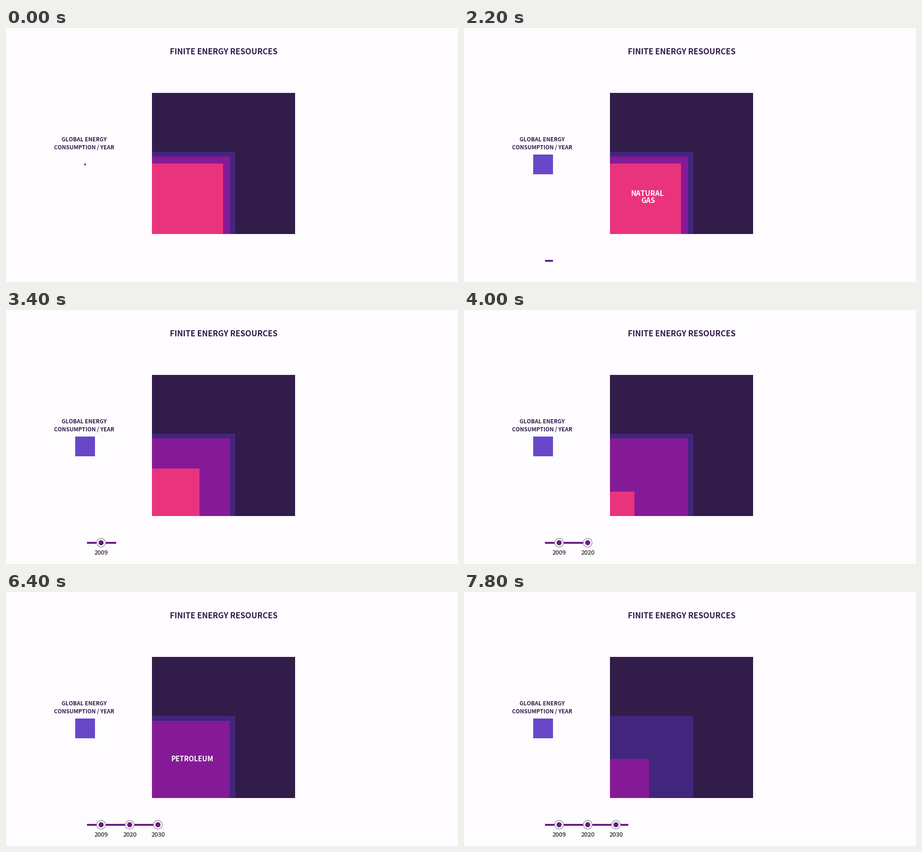
These frames come from a looping animation (960 px wide and 540 px high, 8000 ms). A matplotlib script:

```python
import numpy as np
import matplotlib.pyplot as plt
from matplotlib.animation import FuncAnimation
from matplotlib.patches import Circle, Rectangle

W, H, DPI = 960, 540, 100
STEP, FRAMES = 200, 40
LEFT, BASE = 310, 437.5

INK = "#311c4a"
BLUE = "#42257d"
PURPLE = "#851a96"
PINK = "#ea337d"
VIOLET = "#6848c9"
TRACK = "#6a1b82"

fig = plt.figure(figsize=(W / DPI, H / DPI), dpi=DPI, facecolor="#fefcff")
ax = fig.add_axes([0, 0, 1, 1])
ax.set_xlim(0, W)
ax.set_ylim(H, 0)
ax.axis("off")


def pt(px):
    return px * 72 / DPI


def ramp(t, start, end):
    return float(np.clip((t - start) / (end - start), 0, 1))


def ease(t, start, end):
    return 0.5 - 0.5 * np.cos(np.pi * ramp(t, start, end))


def label(x, y, text, size, color=INK, weight="bold", z=6):
    return ax.text(x, y, text, fontsize=pt(size), color=color, weight=weight,
                   family="Noto Sans CJK JP", ha="center", va="baseline", zorder=z)


def block(w, h, color, z):
    return ax.add_patch(Rectangle((LEFT, BASE - h), w, h, fc=color, lw=0, zorder=z))


def resize(rect, w, h):
    rect.set_bounds(LEFT, BASE - h, w, h)


def marker(x, year):
    ring = Circle((x, 494.8), 9.2, fc="white", ec="#a3a3a3", lw=pt(1.7), zorder=4)
    dot = Circle((x, 494.8), 5.4, fc=TRACK, lw=0, zorder=5)
    ax.add_patch(ring)
    ax.add_patch(dot)
    return ring, dot, label(x, 520, year, 13.2, "black", "normal")


def fade(parts, alpha):
    for part in parts:
        part.set_alpha(alpha)
        part.set_visible(alpha > 0)


label(462.3, 56, "FINITE ENERGY RESOURCES", 16.8)
label(166, 241, "GLOBAL ENERGY", 11.7)
label(166, 258, "CONSUMPTION / YEAR", 11.7)

block(303.5, 299.5, INK, 1)
block(177, 174.5, BLUE, 1.1)
oil = block(166.3, 164.5, PURPLE, 1.2)
gas = block(151, 149.5, PINK, 1.3)
usage = ax.add_patch(Rectangle((0, 0), 1, 1, fc=VIOLET, lw=0, zorder=2))

gas_name = [label(389.5, 357, "NATURAL", 15, "white"),
            label(391, 372, "GAS", 15, "white")]
oil_name = [label(396, 360, "PETROLEUM", 14.6, "white")]

track = ax.add_patch(Rectangle((172, 493), 0, 3.6, fc=TRACK, lw=0, zorder=3))
stops = [(marker(202, "2009"), 2200, 2600),
         (marker(262.7, "2020"), 3500, 3900),
         (marker(322.7, "2030"), 5600, 6000)]


def draw(i):
    t = i * STEP

    side = 42.5 * ease(t, -260, 1100)
    usage.set_bounds(168.2 - side / 2, 290.2 - side / 2, side, side)

    left = 1 - ease(t, 2294, 5131)
    resize(gas, 151 * left, 149.5 * left)
    left = 1 - ease(t, 6220, 9380)
    resize(oil, 166.3 * left, 164.5 * left)

    fade(gas_name, ramp(t, 1700, 2100) - ramp(t, 3000, 3400))
    fade(oil_name, ramp(t, 5200, 5600) - ramp(t, 6800, 7200))

    end = np.interp(t, [1800, 2300, 3000, 4000, 4800, 7800],
                    [172, 193, 210, 271, 288, 349])
    track.set_width(end - 172)
    for parts, start, stop in stops:
        fade(parts, ramp(t, start, stop))
    return []


anim = FuncAnimation(fig, draw, frames=FRAMES, interval=STEP,
                     init_func=lambda: draw(0), repeat=True, repeat_delay=0)
plt.show()
```
